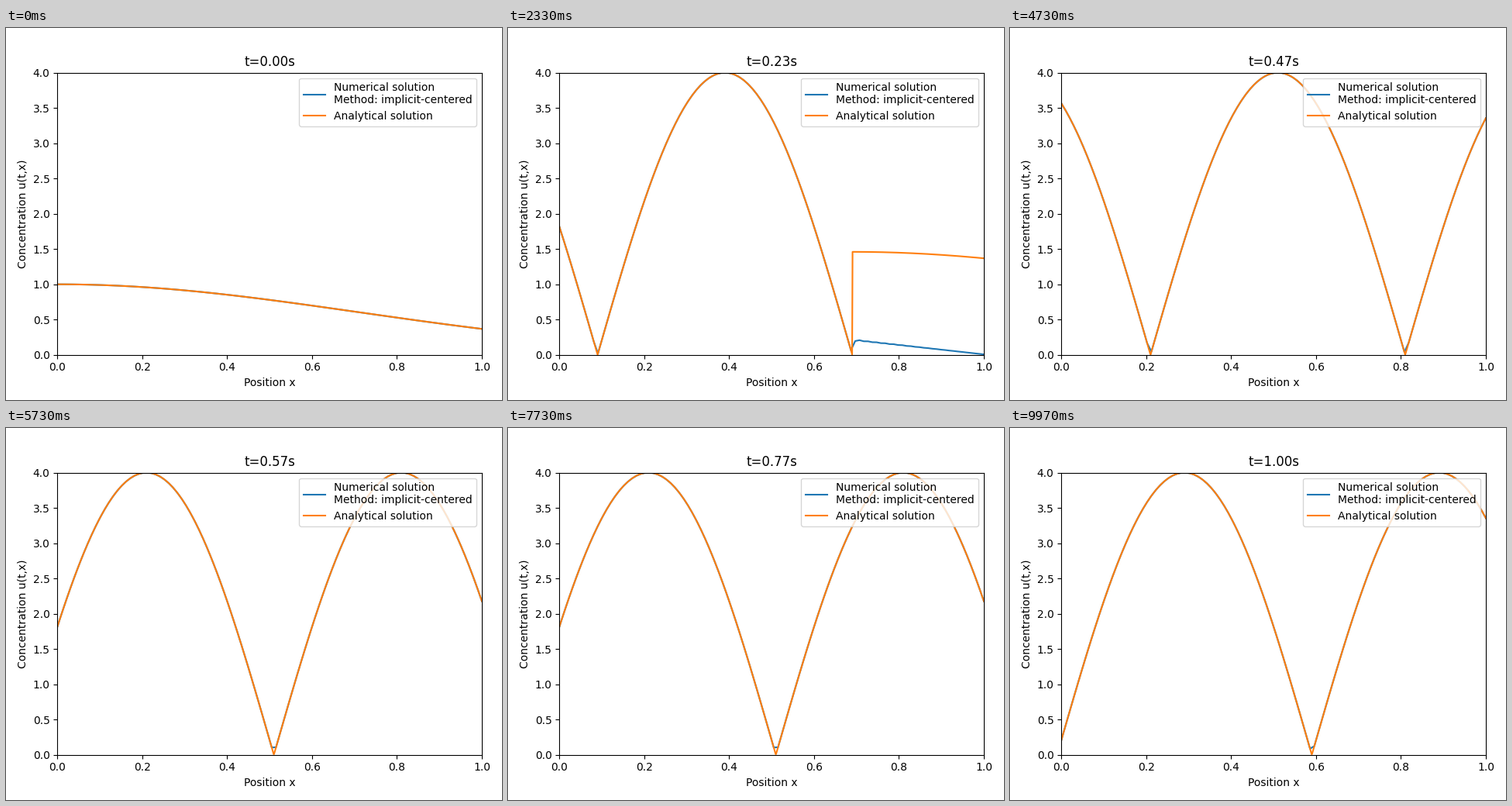
A matplotlib script that plays this animation: 640x480 px, repeating every 10 s.

```python
import numpy as np
import matplotlib.pyplot as plt
from matplotlib.animation import FuncAnimation

FRAMES = 300
LOOP_MS = 10000
DT = 1 / FRAMES
SPEED = 3.0
SOURCE = 2.0
NODES = 100


def inflow(x, t):
    """Wave entering through the left edge."""
    return 4 * np.abs(np.sin(5 * np.pi * (t - x / SPEED)))


def analytical(x, t):
    ahead = np.exp(-(x - SPEED * t) ** 2) + SOURCE * t
    return np.where(x < SPEED * t, inflow(x, t), ahead)


def implicit_centered(x):
    """Solution at every time step, one row per step."""
    half = SPEED * DT / (2 * (x[1] - x[0]))
    off = np.full(len(x) - 1, half)
    step = np.linalg.inv(np.eye(len(x)) - np.diag(off, 1) + np.diag(off, -1))
    u = np.exp(-x ** 2)
    rows = [u]
    for n in range(1, FRAMES):
        t = n * DT
        u = step @ (u + SOURCE * DT)
        u = np.where(x < SPEED * t, inflow(x, t), u)
        rows.append(u)
    return rows


x_num = np.linspace(0, 1, NODES)
x_ana = np.linspace(0, 1, 1000)
history = implicit_centered(x_num)

fig, ax = plt.subplots(figsize=(6.4, 4.8), dpi=100)
num_line, = ax.plot(x_num, history[0],
                    label="Numerical solution\nMethod: implicit-centered")
ana_line, = ax.plot(x_ana, analytical(x_ana, 0), label="Analytical solution")
ax.set(xlim=(0, 1), ylim=(0, 4),
       xlabel="Position x", ylabel="Concentration u(t,x)")
title = ax.set_title("t=0.00s")
ax.legend(loc="upper right")
fig.tight_layout()
fig.subplots_adjust(top=0.88)


def draw(n):
    t = n * DT
    num_line.set_ydata(history[n])
    ana_line.set_ydata(analytical(x_ana, t))
    title.set_text(f"t={t:.2f}s")
    return num_line, ana_line, title


anim = FuncAnimation(fig, draw, frames=FRAMES, interval=LOOP_MS / FRAMES,
                     repeat=True, repeat_delay=0)
plt.show()
```
